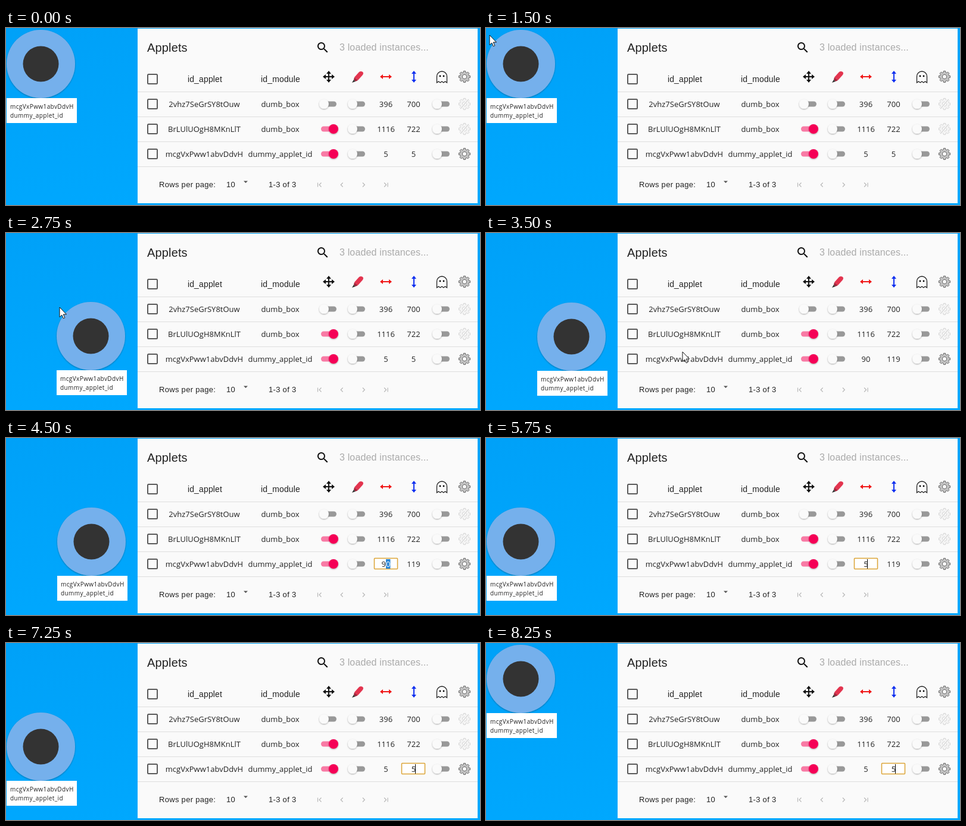
Animation of 796 by 298 pixels, one loop 8500 ms. Source, as an HTML page:

```html
<!DOCTYPE html>
<html lang="en">
<head>
<meta charset="utf-8">
<title>Applet manager</title>
<style>
html, body { margin: 0; width: 100%; height: 100%; overflow: hidden; background: #00a5fb; }
svg { display: block; width: 796px; height: 298px; }
text { white-space: pre; }
.ui { font: 14px "Liberation Sans", Arial, sans-serif; letter-spacing: .15px; fill: #222; }
.page { font-size: 13px; letter-spacing: .3px; }
.cell { font: 13px "Open Sans", "Noto Sans", sans-serif; fill: #222; }
.tip { font: 10px "Open Sans", "Noto Sans", sans-serif; letter-spacing: .4px; fill: #222; }
.mid { text-anchor: middle; }
</style>
</head>
<body>
<svg id="stage" viewBox="0 0 796 298">
  <defs>
    <linearGradient id="sky" x1="0" y1="0" x2=".4" y2="1">
      <stop offset="0" stop-color="#00a1f8"/>
      <stop offset="1" stop-color="#00a8fe"/>
    </linearGradient>
    <filter id="soft" x="-20%" y="-20%" width="140%" height="145%">
      <feDropShadow dx="0" dy="1" stdDeviation="1.2" flood-opacity=".35"/>
    </filter>
    <path id="arrow" d="M0 0V16.5L3.8 13L6.3 18.8L8.8 17.7L6.3 12H11.5Z" fill="#fff" stroke="#111" stroke-linejoin="round"/>
  </defs>
  <rect width="796" height="298" fill="url(#sky)"/>
  <rect x="221" y="1" width="571" height="294" fill="#fafafa"/>
  <g id="panel"></g>
  <g id="fields"></g>
  <g id="applet">
    <circle cx="58.5" cy="60.5" r="57.5" fill="#74b0ec" filter="url(#soft)"/>
    <circle cx="58.5" cy="60.5" r="30" fill="#333"/>
    <rect x="1" y="118" width="118" height="42" fill="#fff"/>
    <text class="tip" x="7" y="136">mcgVxPww1abvDdvH</text>
    <text class="tip" x="7" y="151">dummy_applet_id</text>
  </g>
  <use id="cursor" href="#arrow"/>
</svg>
<script>
const $ = id => document.getElementById(id);
const LOOP = 8500, STEP = 250, DIGIT = 7.43;
const COL_X = 638, COL_Y = 684.5;

const label = (x, y, s, cls, extra = "") =>
  `<text x="${x}" y="${y}" class="${cls}" ${extra}>${s}</text>`;
const at = (x, y, body) => `<g transform="translate(${x} ${y})">${body}</g>`;
const line = (d, color, width) =>
  `<path d="${d}" fill="none" stroke="${color}" stroke-width="${width}"/>`;

const checkbox = y =>
  `<rect x="238" y="${y - 8}" width="16" height="16" rx="1.5" fill="none" stroke="#5a5a5a" stroke-width="2"/>`;

function toggle(x, y, on) {
  const track = on ? -12 : -10;
  return at(x, y,
    `<rect x="${track}" y="-4.5" width="24" height="9" rx="4.5" fill="${on ? "#f87ba5" : "#999"}"/>
     <circle cx="${on ? 9 : -7}" r="8" fill="${on ? "#f50057" : "#fafafa"}" filter="url(#soft)"/>`);
}

function gear(x, y, off) {
  const pts = [];
  for (let i = 0; i < 8; i++) {
    for (const [da, r] of [[-.3, 7.3], [-.17, 9.7], [.17, 9.7], [.3, 7.3]]) {
      const a = i * Math.PI / 4 + da;
      pts.push((r * Math.cos(a)).toFixed(2) + "," + (r * Math.sin(a)).toFixed(2));
    }
  }
  const ink = off ? "#d4d4d4" : "#666";
  return at(x, y,
    `<polygon points="${pts.join(" ")}" fill="${off ? "#f4f4f4" : "#c4c4c4"}" stroke="${ink}"/>
     <circle r="3.7" fill="#fafafa" stroke="${ink}"/>` +
    (off ? line("M-7 8L7 -8", "#fafafa", 3.5) + line("M-7 8L7 -8", ink, 1.2) : ""));
}

// Double-headed arrow along x, turned by an angle
const doubleArrow = (color, turn = 0) =>
  `<g transform="rotate(${turn})">${line("M-7 0H7", color, 2)}
   <path d="M-10 0l5 -4v8zM10 0l-5 -4v8z" fill="${color}"/></g>`;

const marker =
  `<path d="M-5 1L3 -8Q6 -10 9 -8Q11 -6 9 -3L1 6Z" fill="#e3344f"/>
   <path d="M-5 1L1 6L-3 8L-6 5Z" fill="#a82239"/>
   <path d="M-6 5L-3 8L-9 10Z" fill="#333"/>`;

const ghost =
  line("M-8.5 9.5V-1A8.5 8.5 0 0 1 8.5 -1V9.5L5.5 7.5L2.8 9.5L0 7.5L-2.8 9.5L-5.5 7.5Z", "#222", 1.3) +
  `<circle cx="-3" cy="-1.5" r="1.4"/><circle cx="3" cy="-1.5" r="1.4"/>`;

const lens = `<path fill="#111" d="M15.5 14h-.8l-.3-.3A6.5 6.5 0 1 0 13.7 14.4l.3.3v.8l5 5 1.5-1.5zM9.5 14a4.5 4.5 0 1 1 0-9 4.5 4.5 0 0 1 0 9z"/>`;

const rows = [
  { y: 128, id: "2vhz7SeGrSY8tOuw", mod: "dumb_box", x: 396, h: 700, move: false },
  { y: 170, id: "BrLUlUOgH8MKnLlT", mod: "dumb_box", x: 1116, h: 722, move: true },
  { y: 212, id: "mcgVxPww1abvDdvH", mod: "dummy_applet_id", move: true }
];

function buildPanel() {
  let s = label(237, 40, "Applets", "ui", 'style="font-size:20px"') +
    label(560, 38, "3 loaded instances...", "ui", 'style="font-size:16px;fill:#aaa"') +
    at(520, 21, lens);

  for (let y = 107.5; y < 240; y += 42) s += line(`M221 ${y}H792`, "#dedede", 1);

  s += checkbox(86) + label(334, 91, "id_applet", "ui mid") + label(461, 91, "id_module", "ui mid") +
    at(542, 82, doubleArrow("#111") + doubleArrow("#111", 90)) +
    at(590, 82, marker) +
    at(638, 82, doubleArrow("#f01818")) +
    at(685, 82, doubleArrow("#1030f0", 90)) +
    at(732, 82.5, ghost) + gear(770, 82);

  for (const r of rows) {
    const base = r.y + 5;
    s += checkbox(r.y) + label(333, base, r.id, "cell mid") + label(460.5, base, r.mod, "cell mid") +
      toggle(541, r.y, r.move) + toggle(589, r.y) + toggle(731, r.y) + gear(770, r.y, "x" in r);
    if ("x" in r) s += label(COL_X, base, r.x, "cell mid") + label(COL_Y, base, r.h, "cell mid");
  }

  s += label(257, 268, "Rows per page:", "ui page") + label(370, 268, "10", "ui page") +
    '<path d="M399 257.5h7l-3.5 3.5z" fill="#555"/>' + label(441, 268, "1-3 of 3", "ui page");
  const icons = ["M-3 -3.5V3.5M3 -3.5L-.5 0L3 3.5", "M2 -3.5L-1.5 0L2 3.5", "M-2 -3.5L1.5 0L-2 3.5", "M3 -3.5V3.5M-3 -3.5L.5 0L-3 3.5"];
  icons.forEach((d, i) => s += at(526.5 + i * 37.2, 264, line(d, "#b8b8b8", 1.2)));
  return s;
}

// sel: index of the first selected digit; caret: bar after the text
function field(cx, value, { focus, sel, caret } = {}) {
  const str = String(value), left = cx - str.length * DIGIT / 2;
  let s = "";
  if (focus) s += `<rect x="${Math.floor(cx) - 19.5}" y="202.5" width="39" height="18" rx="1" fill="#fff" stroke="#dca436" stroke-width="1.5"/>`;
  let body = str;
  if (sel !== undefined) {
    const n = str.length - sel;
    s += `<rect x="${left + sel * DIGIT}" y="204" width="${n * DIGIT}" height="16" fill="#2a86d8"/>`;
    body = str.slice(0, sel) + `<tspan fill="#fff">${str.slice(sel)}</tspan>`;
  }
  s += label(cx, 217, body, "cell mid");
  if (caret) s += `<rect x="${Math.floor(left + str.length * DIGIT) - 1}" y="204" width="1" height="16" fill="#000"/>`;
  return s;
}

// Last key at or before t; each key is [time, ...values]
const hold = (keys, t) => keys.filter(k => k[0] <= t).pop();

const appletKeys = [
  [0, 0, 0], [2000, 22, 28], [2250, 56, 70], [2500, 90, 127], [2750, 84, 113],
  [3250, 85, 114], [5750, 0, 114], [7500, 0, 0]
];
const cursorKeys = [
  [0], [1000, 68, 108], [1250, 32, 52], [1500, 6, 12], [2000, 31, 44], [2250, 66, 87],
  [2500, 96, 138], [2750, 90, 125], [3250, 100, 134], [3500, 330, 200], [3750, 590, 225], [4000]
];
const xKeys = [
  [0, 5], [3250, 90], [4000, 90, { focus: true }], [4250, 90, { focus: true, caret: true }],
  [4500, 90, { focus: true, sel: 1 }], [4750, 90, { focus: true, sel: 0 }],
  [5500, 5, { focus: true, caret: true }], [6000, 5, { focus: true }], [6250, 5]
];
const yKeys = [
  [0, 5], [3250, 119], [6250, 119, { focus: true, caret: true }], [6500, 119, { focus: true, sel: 2 }],
  [6750, 119, { focus: true, sel: 1 }], [7000, 119, { focus: true, sel: 0 }],
  [7250, 5, { focus: true, caret: true }], [7750, 5, { focus: true }], [8250, 5, { focus: true, caret: true }]
];

let shown = -1;
function draw(now) {
  const t = Math.floor(now % LOOP / STEP) * STEP;
  if (t !== shown) {
    shown = t;
    const [, ax, ay] = hold(appletKeys, t);
    $("applet").setAttribute("transform", `translate(${ax} ${ay})`);
    const [, cx, cy] = hold(cursorKeys, t);
    $("cursor").setAttribute("visibility", cx === undefined ? "hidden" : "visible");
    if (cx !== undefined) $("cursor").setAttribute("transform", `translate(${cx} ${cy})`);
    $("fields").innerHTML = field(COL_X, ...hold(xKeys, t).slice(1)) + field(COL_Y, ...hold(yKeys, t).slice(1));
  }
}

$("panel").innerHTML = buildPanel();
const start = performance.now();
function tick() {
  draw(performance.now() - start);
  requestAnimationFrame(tick);
}
tick();
</script>
</body>
</html>
```
